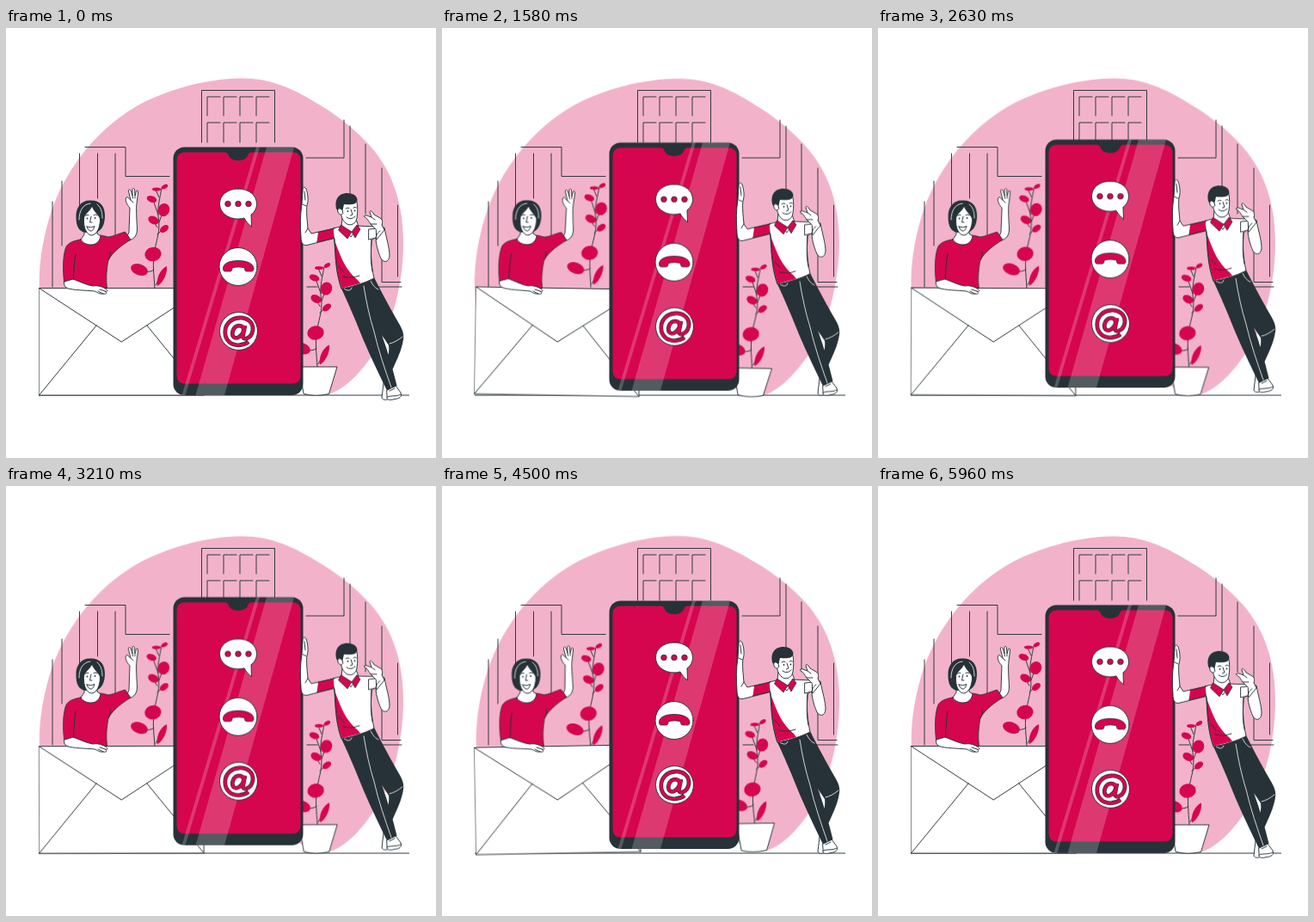
Write an HTML page that moves like this. It is 500x500 px and loops after 6 s.

```html
<!DOCTYPE html>
<html lang="en">
<head>
<meta charset="utf-8">
<title>Contact us</title>
<style>
  html, body { margin: 0; width: 100%; height: 100%; overflow: hidden; background: #fff; }
  svg { display: block; width: 100vw; height: 100vh; }
  .ln { fill: none; stroke: #263238; stroke-width: .95; stroke-linecap: round; stroke-linejoin: round; }
  .wh { fill: #fff; stroke: #263238; stroke-width: .95; stroke-linecap: round; stroke-linejoin: round; }
  .rd { fill: #d6064e; stroke: #263238; stroke-width: .8; stroke-linejoin: round; }
  .red { fill: #d6064e; }
  .dk { fill: #263238; }
  .hi { fill: none; stroke: #fff; stroke-width: .8; stroke-linecap: round; }
  #blob { transform-origin: 250px 242px; }
  #plants { transform-origin: 265px 304.5px; }
  #mail { transform-origin: 134.3px 364.8px; }
  #woman { transform-origin: 110px 248px; }
</style>
</head>
<body>
<svg viewBox="0 0 500 500">
  <defs>
    <g id="plant">
      <path class="ln" d="M173 303C172 285 170 276 173 258C175 246 180 235 177 219C176 208 179 198 181 186M177 217L171 200M178 226L183 212M176 240L183 233M176 232L171 224M178 197L174 188M172 281Q166 286 157 281M174 299L180 289"/>
      <g class="red">
        <ellipse cx="175" cy="187.5" rx="5" ry="2"/>
        <ellipse cx="184.5" cy="184.5" rx="4" ry="2.3" transform="rotate(-30 184.5 184.5)"/>
        <ellipse cx="169.500" cy="199" rx="6" ry="3.7" transform="rotate(20 169.5 199)"/>
        <ellipse cx="183.500" cy="211.500" rx="6.700" ry="7.700" transform="rotate(20 183.5 211.5)"/>
        <ellipse cx="171.500" cy="223.500" rx="6.500" ry="4.500" transform="rotate(28 171.5 223.5)"/>
        <ellipse cx="184" cy="233.500" rx="5.800" ry="3.600" transform="rotate(-38 184 233.5)"/>
        <ellipse cx="171" cy="263" rx="9.700" ry="8.200" transform="rotate(-12 171 263)"/>
        <ellipse cx="155" cy="281" rx="10.300" ry="6.500" transform="rotate(20 155 281)"/>
        <path d="M176 300C174 293 179 280 187 277C188 286 182 297 176 300Z"/>
      </g>
    </g>
    <path id="at" d="M278 346L275.500 358C275 363.500 285 362 287 351.500C288 341 279 336.500 271.500 337C261 337.500 254.500 345 254.800 354C255 363.500 262 369 270.500 368.800C275 368.600 279 367.200 282 365M276.500 351C275.800 344.500 267 344.500 264 351.500C261.500 358.500 266 362 270.500 359.500C274 357.500 276 354 276.500 351"/>
  </defs>

  <path id="blob" fill="#f2b3ca" d="M273 58.500C232 59 185 72 150 92C103 120 66 168 50 222C38 263 36 300 42 335C50 376 90 405 140 411L335 412C348 420 360 427 374 426C396 421 422 391 438 361C453 331 462 288 462 250C462 205 450 168 425 139C407 118 382 99 359 86C333 70 306 58 273 58.500Z"/>

  <g class="ln">
    <path d="M92 138.500H139V172.500H190M54 202V301M65 178V253M85.500 146V225M106.500 146V198M127 146V241"/>
    <path d="M393 107V151H349M400 114V192M418 135V216M437 163V295.500H459M455.500 206V289M350 301H362M427 301H460"/>
    <path d="M227.500 133V72.500H312.500V133"/>
    <path id="panes"/>
    <path d="M38.500 427H468.500"/>
  </g>

  <g id="plants">
    <use href="#plant"/>
    <use href="#plant" x="189" y="91.500"/>
    <path class="wh" d="M341 394H385L375.500 425.500Q360 429 346.500 425.500Z"/>
  </g>

  <g id="mail">
    <path class="wh" d="M38.500 302.500H230V427H38.500Z"/>
    <path class="ln" d="M38.500 302.500L134.300 365L230 302.500M105 346L38.500 427M164 346L230 427"/>
  </g>

  <g id="woman">
    <path class="wh" d="M143 237L144 209C140 205 138 199 140 197C142 195 143 200 145 200L142.500 190C142 187 144.500 187 145.500 190L147 195L147 188C147 186 149.500 186 149.500 188L150 195L151.500 190C152.500 188 154 189 153.500 192L152 204C151 210 152 222 152.500 234C152.500 243 147 247 139 248Z"/>
    <path class="ln" d="M145 200L148 203M147 195L147.500 198M150 195V198"/>
    <path class="rd" d="M86 246C77 248 71 250 69 257C66 267 66 281 67.500 295L79 294L81 302.500H117.500C116 291 117 280 119 270C125 259 136 252 145 246L138.500 237C131 239 126 242 119 243C115 242 112 241 109 241Z"/>
    <path class="wh" d="M87 246L91 240V231H106V239L110 242C109 248 105 252 99 252C94 252 89 250 87 246Z"/>
    <path class="dk" d="M98 200.500C88 200 81 208 81.500 220C81.500 231 85 237 93 238H104C111 236 115 229 115 218C115 207 109 200 98 200.500Z"/>
    <path class="wh" d="M98 207C92 210 90 218 90.500 226C91 235 95 241 100 241C106 240 109 232 109.500 224C109.500 215 107 209 101 206Z"/>
    <path class="dk" d="M99 204C106 206 110 213 110 224C108 217 103 215 100 208C97 214 91 216 90 224C88 214 91 206 99 204Z"/>
    <path class="hi" d="M98 204C89 205 85 213 85 223M106 205C111 209 112 215 112 221"/>
    <path class="ln" d="M99 219L97.500 226H100M92.500 218Q94 216.500 96 217.500M102 217.500Q104 216 106 217.500M94 231Q99 233 103 230.500Q101 237 98 236Q95 235 94 231Z"/>
    <circle class="dk" cx="94.500" cy="221.500" r=".9"/><circle class="dk" cx="103.500" cy="221" r=".9"/>
    <path class="wh" d="M67.500 295L78 292C86 295 94 299 101 300C107 299 113 301 117 304C119 306 117 307 115 306C118 308 117 310 113 309C109 310 106 307 103 306C93 305 78 305 71 302.500C68 301 67 298 67.500 295Z"/>
    <path class="ln" d="M115 306L109 304M113 309L107 306M81 262C79 273 79 284 78.500 292M119 270C121 266 122 264 121 260"/>
  </g>

  <g id="phone">
    <rect class="dk" x="194.500" y="138.500" width="151" height="288.500" rx="13"/>
    <path class="red" d="M208 144.500H254C257 144.500 258 146 259 148.500C262 156 278 156 281 148.500C282 146 283 144.500 286 144.500H333Q342.500 144.500 342.500 154V404Q342.500 413.500 333 413.500H208Q198.500 413.500 198.500 404V154Q198.500 144.500 208 144.500Z"/>
    <g fill="#fff" opacity=".2">
      <path d="M291 138.500H295L208.500 427H204.500Z"/>
      <path d="M303 138.500H333Q335 138.500 334.500 140.500L254 427H220.500Z"/>
    </g>
    <path class="wh" d="M270 187C257.500 187 248.500 194.500 248.500 204.500C248.500 214.500 258 222 270 222C272.500 222 275 221.700 277 221C279 225 282 228 285.500 231L285 217C289 214 291.500 209.500 291.500 204.500C291.500 194.500 282.500 187 270 187Z"/>
    <g class="rd"><circle cx="258" cy="204.500" r="3.300"/><circle cx="270" cy="204.500" r="3.300"/><circle cx="282" cy="204.500" r="3.300"/></g>
    <circle class="wh" cx="270" cy="277.500" r="22"/>
    <path class="rd" d="M252.500 279C253 273.500 260 270.500 270 270.500C280 270.500 287 273.500 288 279C288.300 281.500 287.500 283 285.500 283H280C278 283 277.500 281.500 277.500 279C273 277.500 267.500 277.500 263 279C263 281.500 262.500 283 260.500 283H255C253 283 252.300 281.500 252.500 279Z"/>
    <circle class="wh" cx="270.500" cy="352.500" r="22"/>
    <g fill="none" stroke-linejoin="round">
      <use href="#at" stroke="#263238" stroke-width="4.800"/>
      <use href="#at" stroke="#d6064e" stroke-width="3.400"/>
    </g>
  </g>

  <g id="man">
    <path class="wh" d="M440 399L454 365L458 375C451 389 446 401 444 415L447 430C443 433 438 433 437 430L439 413Z"/>
    <path class="wh" d="M443 421L453 416L459 424C461 429 457 431 452 431.500C447 433 442 433 443 429Z"/>
    <path class="ln" d="M443 429C448 427 454 429 459 426M446 422L452 419"/>
    <path class="dk" d="M390 303L428 290C437 308 448 328 456 342C461 350 463 356 462 362C460 376 453 388 447 403L442 392C444 384 446 376 445 369L437 357C444 376 450 397 454.500 416L443 421.500C432 399 420 374 412 354C405 336 397 318 390 303Z"/>
    <path class="hi" d="M416 300C419 319 423 337 428 353C433 375 441 398 448 418M424 294C427 300 430 303 433 304M393 303C397 306 401 306 402 302M446 367C451 366 456 363 461 359"/>
    <path class="wh" d="M382 233L355 239L351 233C350 222 349 213 350 206C352 201 351 193 349 187C347 184 345 185 345 189L344 205C342 217 342 230 343 243C343 251 346 254 352 252L380 245Z"/>
    <path class="ln" d="M345 205L349 207M347 190L348 200M351 233L348 238"/>
    <path class="wh" d="M398 229L380 233L382 250C383 264 383 283 390 303C402 301 416 297 428 291C424 273 424 257 425 247L441 234C435 230 422 231 408 230Z"/>
    <path class="red" d="M381 233L363 237.500L361.500 249L381 244.500Z"/>
    <path class="red" d="M382.500 248C389 266 395 282 409 293L412 297L390.500 302.500C384 284 383 264 382.500 248Z"/>
    <path class="ln" d="M363 237.500L382 233M361.500 249L381 244.500M382 245C384 272 384 285 390 303M392 289C399 291 405 290 411 288M387 277L393 284M425 246C425 258 423 268 426 283"/>
    <path class="wh" d="M391 221L390 231L401 243L410 231L407 222Z"/>
    <path class="rd" d="M389.500 229L386.500 235L397 245L402 237ZM402 237L406 244L412 234L408 229Z"/>
    <path class="wh" d="M389 204C388 214 390 223 395 227C400 231 407 228 408 221C409 214 409 207 408 202Z"/>
    <path class="dk" d="M384 210C382 202 385 194 393 192.500C401 191 408 194 408.500 200C408 205 402 206 393 205L391 214L387 215Z"/>
    <path class="wh" d="M391 212C388 208 385 210 386 214C387 217 390 218 391.500 216Z"/>
    <path class="ln" d="M401 211L403 217L400.500 218M395 210Q397 208 399 209.500M404 209Q406 207.500 407.500 209M396 220Q401 224 406 219"/>
    <circle class="dk" cx="397.500" cy="213" r=".9"/><circle class="dk" cx="405.500" cy="212.500" r=".9"/>
    <path class="wh" d="M422 234L440 232C442 244 446 255 446 265C445 273 439 273 436 268C432 259 430 250 430 244L422 246Z"/>
    <path class="wh" d="M430 234L424 228C422 225 419 220 417 220C415 218 418 217 422 219L425 220L423 214C423 211 426 213 428 217L435 221C438 223 438 226 437 229L440 235L431 246Z"/>
    <path class="ln" d="M425 220L429 223M424 228L431 228M430 244C431 239 433 237 435 236"/>
  </g>
</svg>
<script>
  const $ = id => document.getElementById(id);
  const LOOP = 6000;

  let panes = '';
  for (const [top, bottom] of [[80, 102], [110, 133]])
    for (let i = 0; i < 4; i++) {
      const x = 234 + i * 19;
      panes += `M${x} ${bottom}V${top}H${x + 15}`;
    }
  $('panes').setAttribute('d', panes);

  const sway = [[0, 0], [.25, 1], [.75, -1], [1, 0]].map(([offset, deg]) =>
    ({ offset, transform: `rotate(${deg}deg)` }));
  const lift = [[0, 0], [.5, -10], [1, 0]].map(([offset, y]) =>
    ({ offset, transform: `translateY(${y}px)` }));

  const play = (ids, frames) => ids.forEach(id =>
    $(id).animate(frames, { duration: LOOP, iterations: Infinity, easing: 'linear' }));

  play(['blob', 'plants', 'mail', 'woman'], sway);
  play(['phone', 'man'], lift);
</script>
</body>
</html>
```
